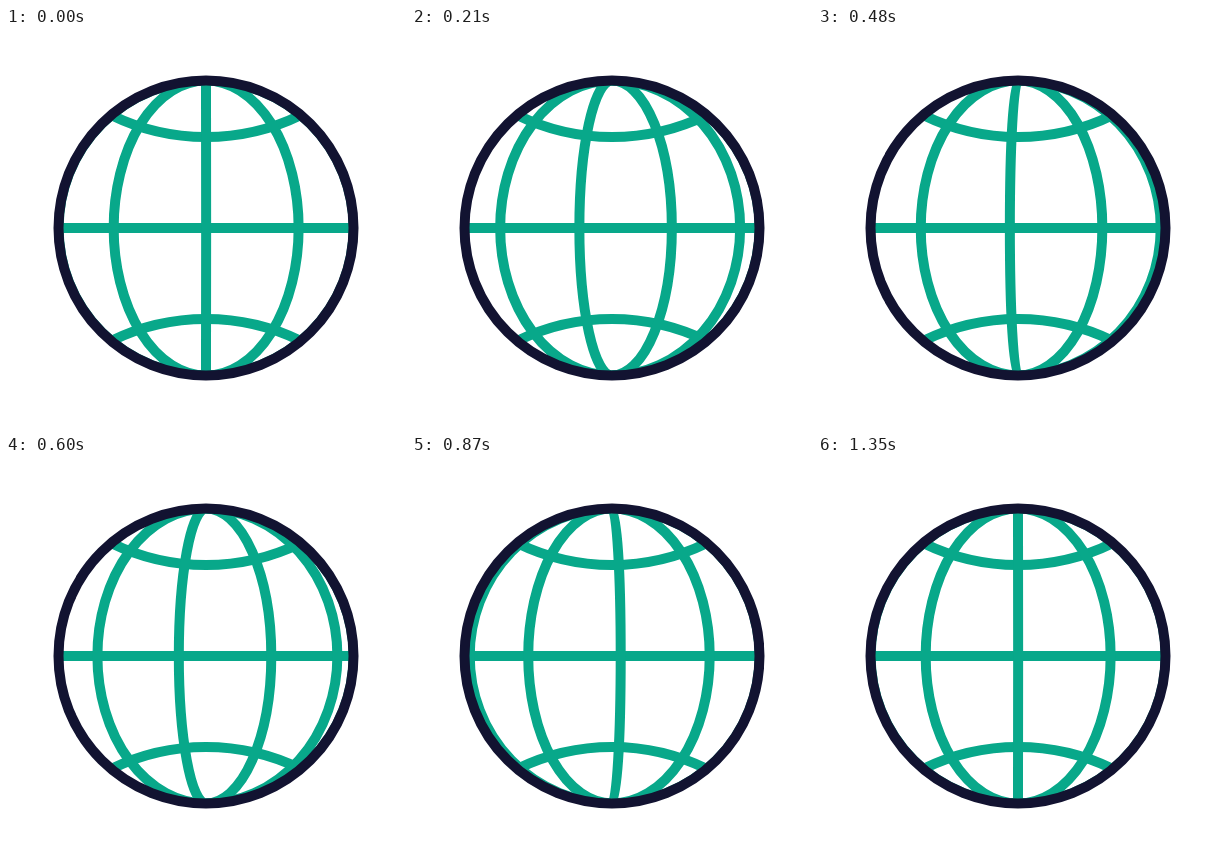
An HTML page without scripts that plays this animation: 400 px wide and 400 px high, repeating every 1410 ms.

```html
<!DOCTYPE html>
<html lang="en">
<head>
<meta charset="utf-8">
<title>Swinging globe</title>
<style>
  @property --frame {
    syntax: "<number>";
    inherits: true;
    initial-value: 0;
  }

  html, body {
    margin: 0;
    width: 100%;
    height: 100%;
    overflow: hidden;
    background: #fff;
  }

  svg {
    display: block;
    width: 100%;
    height: 100%;
    fill: none;
    stroke: #08a88a;
    stroke-width: 10;
  }

  .rim { stroke: #121331; }

  /* The turn is a sum of three eased moves: out, back past the start, settle. */
  .meridians {
    --out: clamp(0, var(--frame) / 11.7, 1);
    --back: clamp(0, (var(--frame) - 11.7) / 26, 1);
    --settle: clamp(0, (var(--frame) - 37.7) / 7.3, 1);
    --turn: (
      1 * var(--out) * var(--out) * (3 - 2 * var(--out))
      - 1.228 * var(--back) * var(--back) * (3 - 2 * var(--back))
      + 0.228 * var(--settle) * var(--settle) * (3 - 2 * var(--settle))
    );
    animation: clock 1410ms steps(47) infinite;
  }

  /* Each meridian is a half circle squeezed sideways; steps shrink near the rim. */
  .meridians path {
    --step: (var(--slot) + var(--turn));
    vector-effect: non-scaling-stroke;
    transform: scaleX(calc(
      0.373 * clamp(-2, var(--step), 2)
      + 0.254 * clamp(-1, var(--step), 1)
      + 0.001
    ));
  }

  @keyframes clock {
    from { --frame: 0; }
    to { --frame: 47; }
  }
</style>
</head>
<body>
<svg viewBox="0 0 400 400">
  <defs>
    <clipPath id="ball"><circle r="150"/></clipPath>
    <path id="half" d="M0-147.5A147.5 147.5 0 0 1 0 147.5"/>
  </defs>
  <g transform="translate(200 200)">
    <g clip-path="url(#ball)">
      <path d="M-147 0H147M-95-113A216 216 0 0 0 95-113M-95 113A216 216 0 0 1 95 113"/>
      <g class="meridians">
        <path style="--slot: -2" d="M0-147.5A147.5 147.5 0 0 1 0 147.5"/>
        <path style="--slot: -1" d="M0-147.5A147.5 147.5 0 0 1 0 147.5"/>
        <path style="--slot: 0" d="M0-147.5A147.5 147.5 0 0 1 0 147.5"/>
        <path style="--slot: 1" d="M0-147.5A147.5 147.5 0 0 1 0 147.5"/>
        <path style="--slot: 2" d="M0-147.5A147.5 147.5 0 0 1 0 147.5"/>
      </g>
    </g>
    <circle class="rim" r="147.5"/>
  </g>
</svg>
</body>
</html>
```
